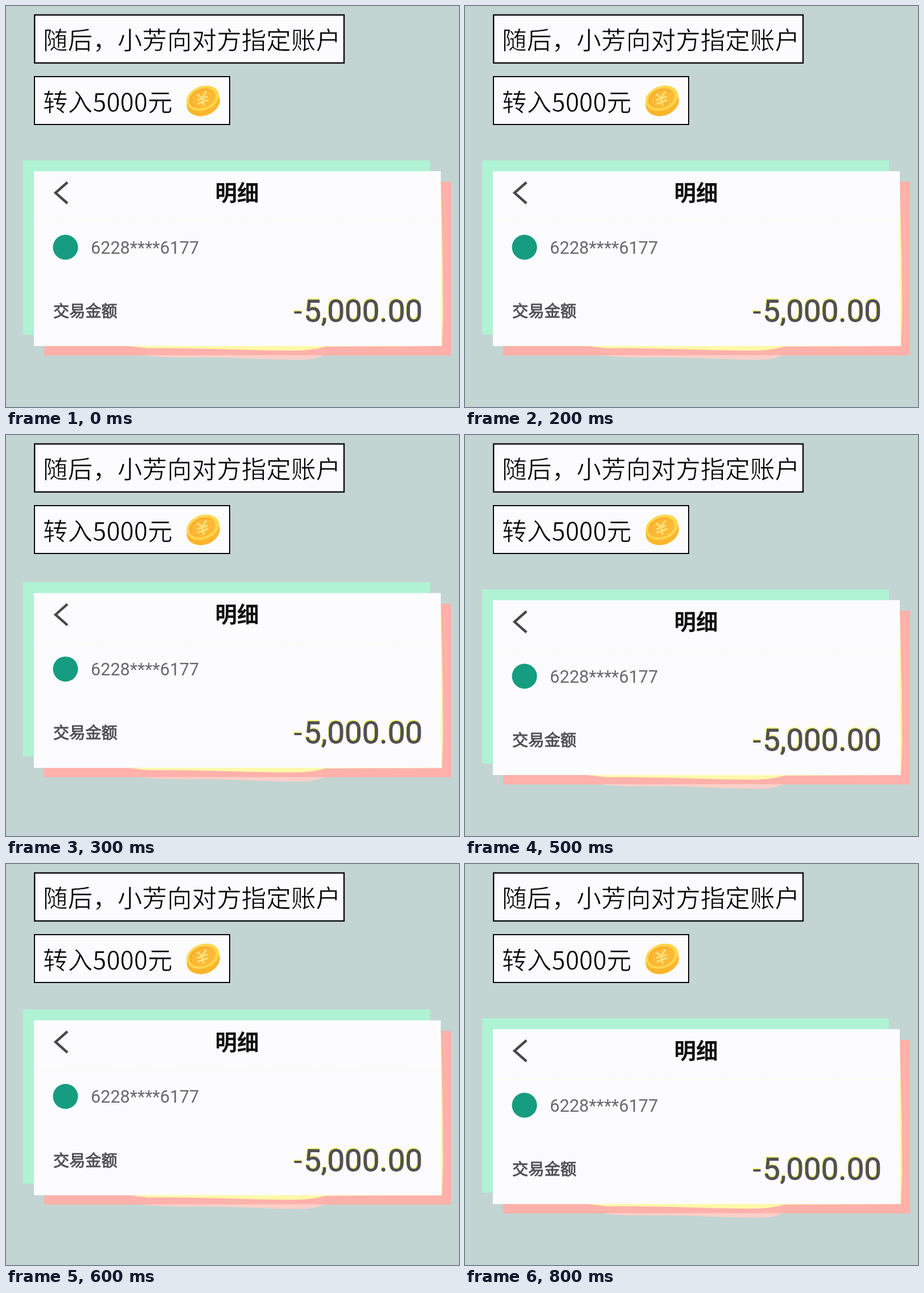
Write an HTML page that moves like this. It is 796 px wide and 704 px high and loops after 1.9 s.

```html
<!DOCTYPE html>
<html lang="zh-CN">
<head>
<meta charset="utf-8">
<style>
  html, body { margin: 0; width: 100%; height: 100%; overflow: hidden; background: #c2d5d2; }
  svg { display: block; width: 796px; height: 704px; }
  text { font-family: "Noto Sans CJK SC", "Noto Sans CJK", sans-serif; }
  .box { fill: #fcfcfe; stroke: #080808; }
  /* The pale stroke thins the glyphs to a light weight. */
  .note { font-size: 43.6px; font-weight: 300; fill: #000; stroke: #fcfcfe; stroke-width: .7px; }
  .num { font-family: Roboto, sans-serif; }
  .sum { font-size: 54.5px; fill: #505054; filter: drop-shadow(-1px -2px 0 #fbf96c); }
  .bold { stroke: #505054; stroke-width: .9px; }
</style>
</head>
<body>
<svg viewBox="0 0 796 704">
  <rect class="box" x="50.2" y="15.7" width="543.8" height="84.3" stroke-width="2.4"/>
  <text class="note" x="65" y="76">随后，小芳向对方指定账户</text>
  <rect class="box" x="50" y="124" width="343" height="84" stroke-width="2"/>
  <text class="note" x="65" y="185">转入5000元</text>

  <g transform="translate(346 165) rotate(-20)">
    <ellipse cx="-1" cy="4.500" rx="30" ry="23" fill="#fbb62d"/>
    <ellipse cx="1" cy="-3" rx="29.500" ry="21" fill="#ffd64d"/>
    <ellipse cx="0" cy="-3" rx="23.500" ry="16.500" fill="#f9a92c"/>
    <ellipse cx="1" cy="-1.500" rx="22" ry="15" fill="#fdb935"/>
    <path d="M-6-13 0-4 11-12M0-4-2 10M-10-3H10M-11 3H9" fill="none" stroke="#ffe07d" stroke-width="3.200"/>
  </g>

  <g id="card">
    <rect x="30" y="271" width="715" height="306" fill="#b0f3d4"/>
    <rect x="67" y="308.500" width="715" height="305" fill="#ffb1ab"/>
    <path d="M238 613H558Q545 621 515 621C455 621 390 616 320 617Q265 617 238 613Z" fill="#fbcfc9"/>
    <path d="M764 306 767 440 768 540 766 597 560 598Q540 605 500 605C420 605 340 600 250 601L215 597 764 590Z" fill="#fff9a9"/>
    <path d="M49 290H764V540L765 597H49Z" fill="#fcfcfe"/>
    <path d="M56 377.500H764" stroke="#fdfae6" stroke-width="1.500" stroke-dasharray="9 4"/>
    <path d="M108 309.500 87 328 108 346.500" fill="none" stroke="#484846" stroke-width="4.400"/>
    <text x="406" y="342" font-size="38.500" font-weight="700" text-anchor="middle" fill="#111">明细</text>
    <circle cx="104.500" cy="423.500" r="22" fill="#169c80"/>
    <text class="num" x="149" y="434.500" font-size="30.600" fill="#69696d">6228****6177</text>
    <text class="bold" x="83" y="546" font-size="28.200" fill="#505054">交易金额</text>
    <text class="num sum" x="505.500" y="554">-</text>
    <text class="num sum bold" x="732" y="554" text-anchor="end">5,000.00</text>
  </g>
</svg>
<script>
  const LOOP = 1900, MOVE = 800, HOPS = 3, STEP = 100, LIFT = 15.5;
  const card = document.getElementById("card");
  const easeOut = u => 1 - (1 - Math.min(1, u)) ** 2;

  // Each hop springs up, rests, then drops back and rests.
  function height(t) {
    if (t >= MOVE) return 0;
    const p = t * HOPS / MOVE % 1;
    return LIFT * (p <= 0.5 ? easeOut(p / 0.22) : 1 - easeOut((p - 0.5) / 0.22));
  }

  function draw(now) {
    const t = Math.floor(now % LOOP / STEP) * STEP;
    card.setAttribute("transform", `translate(0 ${-height(t)})`);
    requestAnimationFrame(draw);
  }
  draw(performance.now());
</script>
</body>
</html>
```
